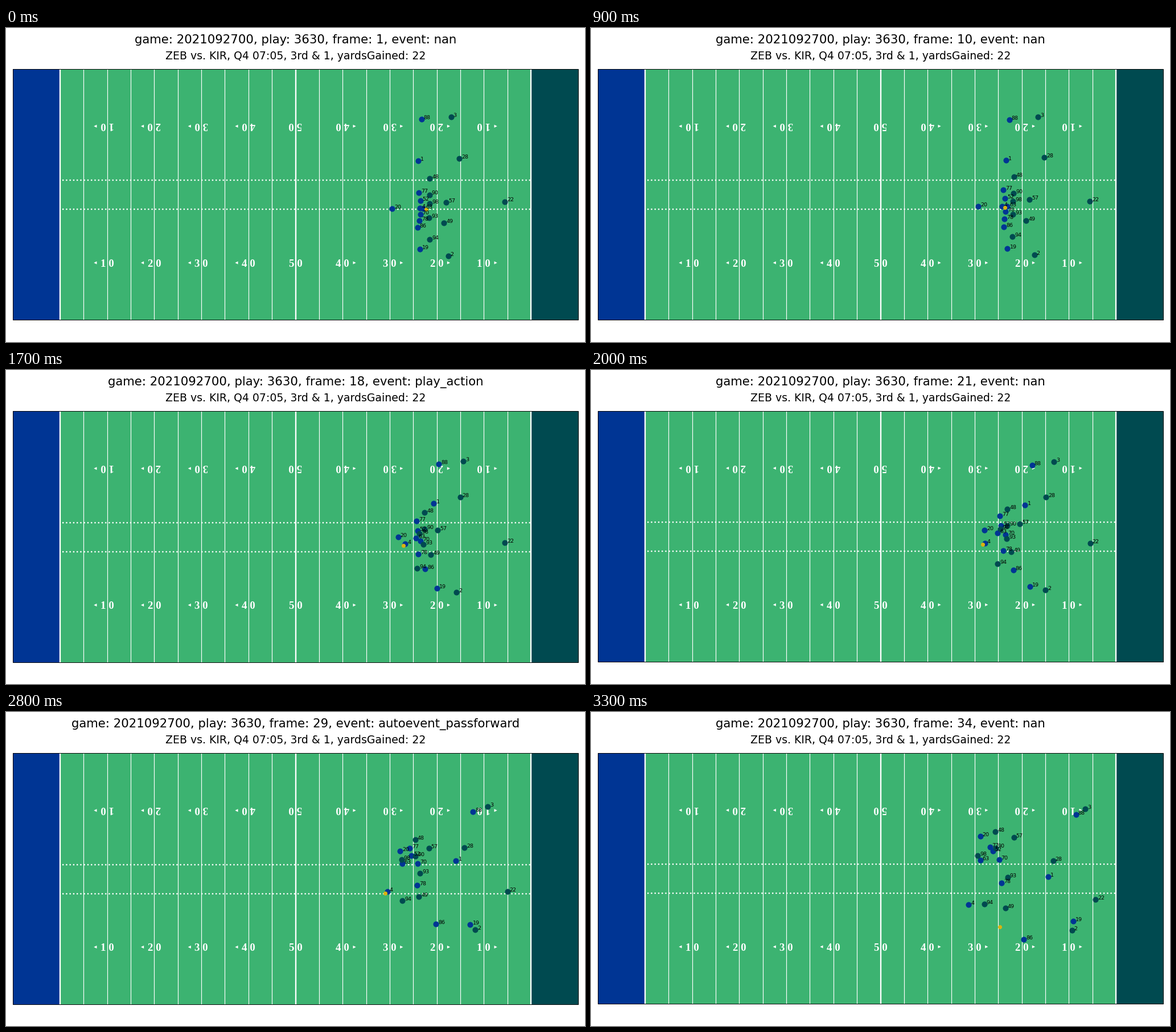
Write a matplotlib script that moves like this. It is 1017 px wide and 551 px high and loops after 3400 ms.

```python
import numpy as np
import matplotlib.pyplot as plt
from matplotlib.animation import FuncAnimation
from matplotlib.patches import Rectangle

W, H, DPI = 1017, 551, 64
PT = 85 / DPI                       # the design uses points at 85 dpi
YARD, MID_X, TOP, BOTTOM = 8.268, W / 2, 71.7, 512.4
FRAMES, STEP = 34, 100
HOME, AWAY, GRASS, BALL = "#003594", "#004A50", "#3CB371", "#D9B310"

EVENTS = {5: "ball_snap", 17: "play_action", 28: "autoevent_passforward"}
SNAP, MIDWAY, THROW, END = 4, 23, 28, 33
T = np.arange(FRAMES)


def yard_x(yard):
    return MID_X + YARD * (yard - 60)


def run(start, end, mid=None):
    """Path that leaves rest at the snap and passes mid on its way to end."""
    start = np.array(start, float)
    whole = end - start
    part = whole / 2 if mid is None else mid - start
    u = np.clip((T - SNAP) / (END - SNAP), 0, 1)[:, None]
    m = (MIDWAY - SNAP) / (END - SNAP)
    a = (part - m ** 3 * whole) / (m ** 2 - m ** 3)
    return start + a * u ** 2 + (whole - a) * u ** 3


fig = plt.figure(figsize=(W / DPI, H / DPI), dpi=DPI, facecolor="white")
ax = fig.add_axes([0, 0, 1, 1])
ax.set_xlim(0, W)
ax.set_ylim(H, 0)
ax.axis("off")


def box(yard, width, **style):
    ax.add_patch(Rectangle((yard_x(yard), TOP), width * YARD, BOTTOM - TOP, **style))


def line(xs, ys, width, style="-"):
    ax.plot(xs, ys, style, color="white", lw=width * PT, zorder=2,
            solid_capstyle="butt")


def yard_number(yard):
    n, x = 50 - abs(60 - yard), yard_x(yard)
    for base, turn, mid in ((419, 0, 412), (165.5, 180, 172.3)):
        ax.text(x, base, " ".join(str(n)), rotation=turn, rotation_mode="anchor",
                ha="center", va="baseline", color="white", zorder=2,
                family="Liberation Serif", weight="bold", size=16 * PT)
        if n < 50:
            s = 1 if yard > 60 else -1
            ax.fill([x + s * 18.3, x + s * 23.5, x + s * 18.3],
                    [mid - 2.6, mid, mid + 2.6], color="white", lw=0, zorder=2)


def draw_field():
    box(0, 120, fc=GRASS, lw=0, zorder=0)
    box(0, 10, fc=HOME, lw=0, zorder=1)
    box(110, 10, fc=AWAY, lw=0, zorder=1)
    for yard in range(10, 111, 5):
        x = yard_x(yard)
        line([x, x], [TOP, BOTTOM], 2 if yard in (10, 60, 110) else 1)
    for y in (267.1, 318.1):
        line([yard_x(10.5), yard_x(110)], [y, y], 2, ":")
    for yard in range(20, 101, 10):
        yard_number(yard)
    box(0, 120, fc="none", ec="black", lw=0.8 * PT, zorder=2.5)


def dots(color, area, z):
    return ax.scatter([], [], s=area * PT ** 2, color=color, lw=1.5 * PT, zorder=z)


draw_field()
teams = {HOME: dots(HOME, 50, 3), AWAY: dots(AWAY, 50, 4)}
ball_dot = dots(BALL, 20, 5)
players = {HOME: [], AWAY: []}


def player(team, number, *points):
    path = run(*points)
    label = ax.text(0, 0, str(number), size=8 * PT, family="DejaVu Sans",
                    color="black", va="baseline", zorder=6)
    players[team].append((path, label))
    return path


# Start, end and, where the route bends, a point on the way.
player(HOME, 88, (729.5, 159.7), (851.5, 180))
player(HOME, 19, (726.5, 387.5), (846.5, 366.7))
player(HOME, 1, (723.5, 233), (802.5, 289), (773.5, 243))
player(HOME, 86, (722.7, 350), (760, 399), (747, 355.5))
player(HOME, 20, (678.2, 316.7), (683.5, 217.7), (693, 268))
player(HOME, 77, (725, 289), (700.5, 236.7), (715.5, 248.5))
player(HOME, 52, (727.5, 303), (705.5, 243.5), (717.5, 264.5))
player(HOME, 63, (733, 317), (683.5, 259.7), (707.5, 277.3))
player(HOME, 70, (727.5, 327), (716.5, 259), (726.5, 279.5))
player(HOME, 78, (726, 337.5), (721, 299.5), (723, 311.5))
passer = player(HOME, 4, (726.5, 315.5), (663, 337.5), (682.5, 305))

player(AWAY, 3, (781.5, 155.5), (868, 169.7))
player(AWAY, 48, (744, 263.5), (710, 209.7))
player(AWAY, 90, (743.5, 292.5), (710.5, 238.5))
player(AWAY, 28, (796, 228.7), (811.5, 261), (800.5, 225.7))
player(AWAY, 98, (744, 307.5), (679, 251.5), (710, 270.5))
player(AWAY, 57, (773, 305.7), (742.5, 219.5), (748, 258))
player(AWAY, 22, (876.2, 304.5), (886, 329), (877.5, 306.5))
player(AWAY, 93, (743, 333), (731.5, 289.5), (728, 289))
player(AWAY, 49, (769, 342), (727.5, 343.5), (731.5, 317.7))
player(AWAY, 94, (744, 371), (690.5, 337), (706.5, 334.5))
player(AWAY, 2, (776.5, 399.5), (844.5, 383), (806.5, 383.7))


def ball_path():
    """Snapped back to the passer, carried, then thrown in a straight line."""
    reach = np.interp(T, [SNAP + 1, SNAP + 11], [11, -3.5])
    held = passer + np.column_stack([reach, np.full(FRAMES, 2.5)])
    u = np.clip((T - THROW) / (END - THROW), 0, 1)[:, None]
    return np.where(u > 0, held[THROW] + u * ((717.5, 376.5) - held[THROW]), held)


def heading(base, size, text=""):
    return fig.text(0.5, 1 - base / H, text, ha="center", va="baseline",
                    size=size * PT, family="DejaVu Sans", color="black")


ball = ball_path()
title = heading(27, 18)
heading(55, 16, "ZEB vs. KIR, Q4 07:05, 3rd & 1, yardsGained: 22")


def draw(i):
    event = EVENTS.get(i, "nan")
    title.set_text(f"game: 2021092700, play: 3630, frame: {i + 1}, event: {event}")
    # A title with an underscore pushes the field down slightly.
    drop = 0.45 if "_" in event else 0
    ax.set_ylim(H - drop, -drop)
    for team, dot in teams.items():
        dot.set_offsets([path[i] for path, _ in players[team]])
        for path, label in players[team]:
            label.set_position(path[i] + (YARD / 2, 0))
    ball_dot.set_offsets(ball[i:i + 1])
    return []


anim = FuncAnimation(fig, draw, frames=FRAMES, interval=STEP, repeat=True)
plt.show()
```
